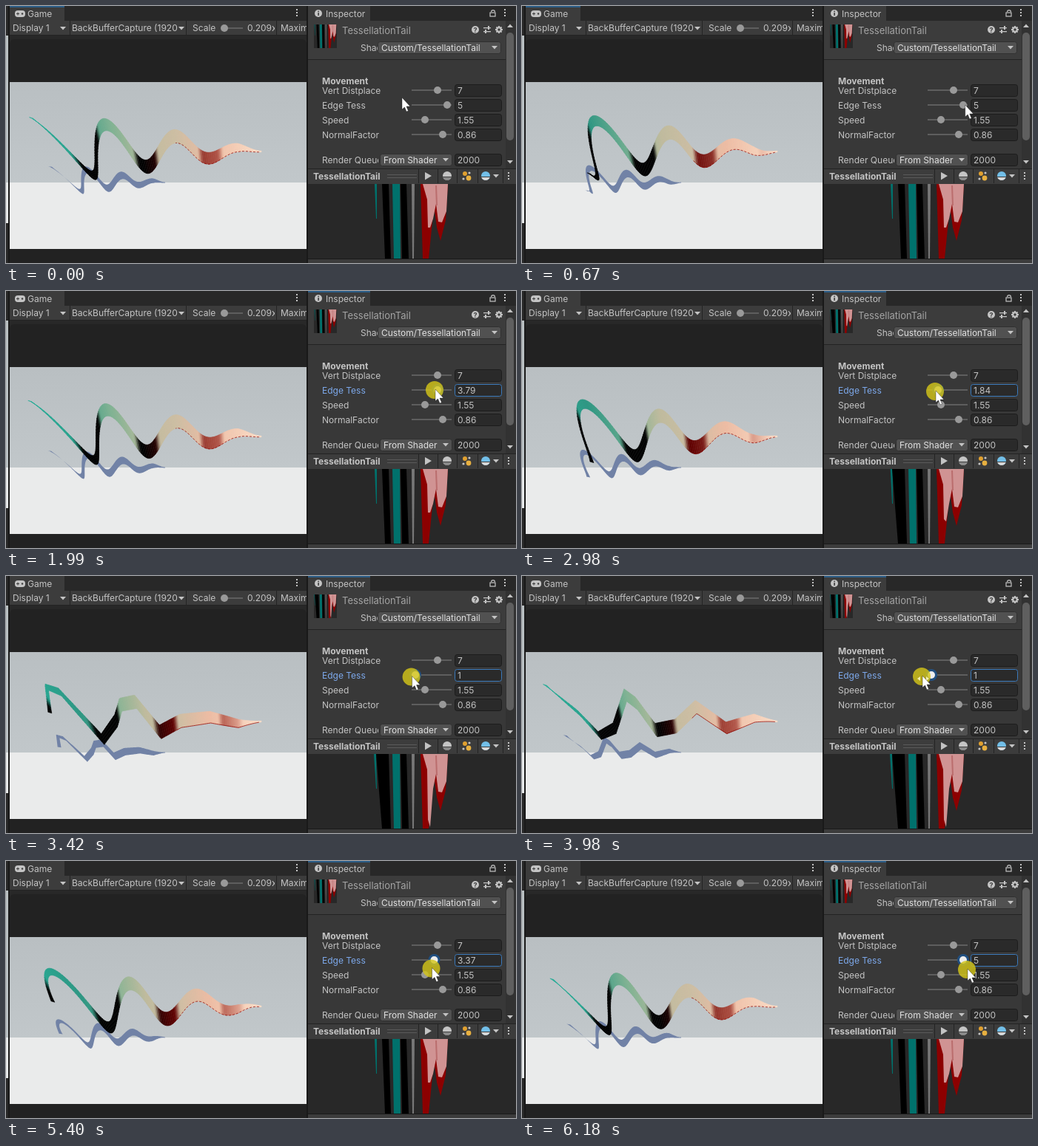
Write an HTML page with a canvas that moves like this. It is 689 px wide and 348 px high and loops after 6.3 s.

```html
<!DOCTYPE html>
<html>
<head>
<meta charset="utf-8">
<style>
html, body { margin: 0; width: 100%; height: 100%; overflow: hidden; background: #282828 }
canvas { display: block }
</style>
</head>
<body>
<canvas id="stage" width="689" height="348"></canvas>
<script>
const g = document.getElementById('stage').getContext('2d');
const LOOP = 6300, STEP = 110.4, FOCUS = 990, DRAG = 1400;
const TEXT = '#c4c4c4', PANE = '#383838', BAR = '#3c3c3c', EDGE = '#232323';

const clamp = (v, a = 0, b = 1) => Math.min(b, Math.max(a, v));
const mix = (a, b, k) => a + (b - a) * k;
const smooth = k => (k = clamp(k), k * k * (3 - 2 * k));

// Linear interpolation through rows of [key, value, value, ...].
function track(rows, key) {
  let i = 1;
  while (i < rows.length - 1 && rows[i][0] < key) i++;
  const a = rows[i - 1], b = rows[i], k = clamp((key - a[0]) / (b[0] - a[0]));
  return a.slice(1).map((v, j) => mix(v, b[j + 1], k));
}

// ---- drawing helpers
function rect(x, y, w, h, color) { g.fillStyle = color; g.fillRect(x, y, w, h); }
function round(x, y, w, h, color, border, r = 3) {
  g.beginPath(); g.roundRect(x + .5, y + .5, w - 1, h - 1, r);
  g.fillStyle = color; g.fill();
  g.strokeStyle = border; g.lineWidth = 1; g.stroke();
}
function dot(x, y, r, color) {
  g.beginPath(); g.arc(x, y, r, 0, 7); g.fillStyle = color; g.fill();
}
function poly(points, color) {
  g.beginPath();
  for (let i = 0; i < points.length; i += 2) g.lineTo(points[i], points[i + 1]);
  g.closePath(); g.fillStyle = color; g.fill();
}
function line(points, color, width = 1) {
  g.beginPath();
  for (let i = 0; i < points.length; i += 2) g.lineTo(points[i], points[i + 1]);
  g.strokeStyle = color; g.lineWidth = width; g.stroke();
}
function label(s, x, y, color = TEXT, size = 12, weight = 400) {
  g.font = `${weight} ${size}px Inter, Roboto, sans-serif`;
  g.fillStyle = color; g.fillText(s, x, y);
}
function clipped(x, y, w, h, paint) {
  g.save(); g.beginPath(); g.rect(x, y, w, h); g.clip(); paint(); g.restore();
}
const arrow = (x, y, s = 4, d = 1) => poly([x - s, y - 2 * d, x + s, y - 2 * d, x, y + 2.5 * d], TEXT);
const dots = (x, y) => [-4, 0, 4].forEach(d => rect(x - 1, y + d - 1, 2, 2, TEXT));

// ---- the waving tail: u runs from the head (0) to the tip (1)
const KNOTS = [0, .11, .245, .387, .49, .59, .66, .70, .8, .9, .94, 1];
const LIGHT = [[0, 252, 222, 200], [.25, 238, 188, 163], [.4, 206, 190, 163], [.55, 192, 187, 157],
  [.7, 125, 178, 146], [.85, 45, 150, 130], [1, 35, 172, 150]];
const DARK = [[0, 205, 110, 95], [.25, 165, 70, 58], [.42, 96, 0, 0], [.53, 25, 0, 0], [.58, 0, 0, 0], [1, 0, 0, 0]];

const phase = (u, t) => 2 * Math.PI * ((232 - 88 * t / 2027) - (345 - 282 * u)) / 88;
const thick = u => 1.5 + 17 * (4 * u * (1 - u)) ** .6 * clamp(u * 9);

function curve(u, t) {
  const lift = 44 * u * Math.cos(phase(u, t));
  return [345 - 282 * u - .75 * u ** 3 * lift, 197 - 7 * u - lift];
}
function tailPoint(u, t, coarse) {
  if (!coarse) return curve(u, t);
  return track(KNOTS.map(k => [k, ...curve(k, t)]), u);
}
function tailColor(u, t) {
  const k = clamp((u - .5) / .25), limit = -.55 + .6 * k;
  const lit = Math.cos(phase(u, t) + .52 * k);
  const shade = smooth((limit + .28 - lit) / .56) * smooth(u / .25);
  const a = track(LIGHT, u), b = track(DARK, u);
  return `rgb(${a.map((c, i) => Math.round(mix(c, b[i], shade)))})`;
}
function tail(t, coarse) {
  const N = 180, top = [], low = [], shadeTop = [], shadeLow = [];
  for (let i = 0; i <= N; i++) {
    const u = i / N, [x, y] = tailPoint(u, t, coarse), h = thick(u) / 2, s = 2.5 * u;
    top.push([x - s, y - h]);
    low.push([x + s, y + h]);
    const sx = 215 - (345 - x) * .5, sy = 239 - 2 * u + (y - 197) * .43;
    shadeTop.push([sx - s, sy - h * .55]);
    shadeLow.push([sx + s, sy + h * .55]);
  }
  poly([...shadeTop, ...shadeLow.reverse()].flat(), '#7182a6');
  for (let i = 0; i < N; i++) {
    const color = tailColor((i + .5) / N, t);
    const quad = [...top[i], ...top[i + 1], ...low[i + 1], ...low[i]];
    poly(quad, color);
    line([...quad, ...top[i]], color, .6);
  }
  g.setLineDash(coarse ? [] : [3, 2]);
  line(low.slice(2, N * .42).flat(), 'rgba(140,0,0,.75)', 1);
  g.setLineDash([]);
}

// ---- game view
function gameView(t, focused, coarse) {
  rect(0, 0, 407, 348, '#282828');
  rect(0, 40, 3, 199, '#b9c0c3');
  rect(0, 239, 3, 55, '#e6e8e9');
  rect(3, 0, 2, 348, '#191919');
  rect(5, 0, 74, 20, BAR);
  if (!focused) rect(5, 0, 74, 2, '#2c5d87');
  // gamepad
  g.beginPath(); g.roundRect(12, 6, 14, 9, 4); g.fillStyle = TEXT; g.fill();
  rect(14, 10, 4, 1, BAR); rect(15.5, 8.5, 1, 4, BAR); dot(22, 10.5, 1.2, BAR);
  label('Game', 29, 15);
  dots(393, 9);
  rect(5, 20, 402, 20, BAR);
  rect(5, 39, 402, 1, EDGE);
  label('Display 1', 9, 34); arrow(77, 30);
  label('BackBufferCapture (1920', 89, 34); arrow(237, 30);
  label('Scale', 252, 34);
  rect(291, 29, 29, 2, '#5e5e5e'); dot(295, 30, 5, '#999');
  clipped(320, 20, 43, 20, () => label('0.209x', 326, 34));
  clipped(366, 20, 40, 20, () => label('Maximize', 371, 34));
  [86, 243, 365].forEach(x => rect(x, 20, 1, 20, EDGE));
  rect(5, 40, 402, 308, '#282828');
  g.beginPath(); g.roundRect(5, 45, 401, 310, 6); g.fillStyle = '#222'; g.fill();

  const wall = g.createLinearGradient(0, 103, 0, 239);
  wall.addColorStop(0, '#b9bfc2'); wall.addColorStop(1, '#c1c7ca');
  rect(5, 103, 401, 136, wall);
  rect(5, 239, 401, 90, '#eaebeb');
  tail(t, coarse);
}

// ---- material preview; k is the share of coarse jaggedness
function strips(k) {
  const teal = '#00716c', red = '#8c0000', pink = '#d09393';
  poly([498 - k, 241, 501 - k, 241, 501, 288, 500, 288], teal);
  poly([508, 241, 517, 241, 520, 342, 512, 342], '#000');
  if (k) poly([500, 241, 512, 241, 513, 342, 508, 342], '#000');
  poly([522, 241, 532, 241, 533, 342, 524, 342], teal);
  poly([533, 241, 541, 241, 544, 342, 535, 342], '#000');
  poly([548, 241, 552, 241, 551, 342, 549, 342], '#777');
  poly([560, 241, 582, 241, 576, 292, 571, 342, 563, 342], red);
  poly([576, 241, 597, 241, 594, 290, 587, 318, 582, 300, 578, 270], red);
  poly([563, 241, 597, 241, 595, 278, 589, 293, 584, 292, 581, 268, 577, 288, 573, 300 + 40 * k, 570, 300 + 30 * k, 569, 262], pink);
  line([581, 243, 582, 270], '#ba6d6d', 2);
}

// ---- inspector
function slider(y, x, active) {
  rect(548, y - 1, 54, 2, '#5e5e5e');
  if (active) dot(x, y, 8, '#214f80');
  dot(x, y, 5, active ? '#eee' : '#999');
}
function field(y, s, active) {
  round(606, y - 8, 64, 17, '#2a2a2a', active ? '#3a79bb' : '#1c1c1c');
  label(s, 610, y + 5);
}
function dropdown(x, y, w, s) {
  round(x, y - 8, w, 17, '#515151', '#303030');
  label(s, x + 5, y + 5, '#e0e0e0');
  arrow(x + w - 9, y);
}
function inspector(t, focused, value, k) {
  rect(407, 0, 282, 348, PANE);
  rect(406, 0, 2, 348, '#191919');
  rect(408, 0, 281, 20, '#282828');
  rect(408, 0, 84, 20, BAR);
  if (focused) rect(408, 0, 84, 2, '#2c5d87');
  dot(422, 10, 5, TEXT); rect(421.3, 9, 1.6, 4, BAR); rect(421.3, 6.6, 1.6, 1.5, BAR);
  label('Inspector', 432, 15);
  g.strokeStyle = TEXT; g.lineWidth = 1.2;
  g.strokeRect(654, 9, 7, 5);
  g.beginPath(); g.arc(658, 8, 2.4, Math.PI, 0); g.stroke();
  dots(674, 9);

  rect(408, 20, 281, 53, BAR);
  rect(416, 25, 31, 32, '#282828');
  clipped(416, 25, 31, 32, () => {
    g.translate(416, 25); g.scale(.3, .32); g.translate(-496, -241); strips(k);
  });
  label('TessellationTail', 454, 38, '#a4a4a4', 13);
  dot(634, 32, 5, TEXT); label('?', 631.5, 35.5, BAR, 9, 700);
  [29, 34].forEach((y, i) => {
    rect(645, y, 10, 1.3, TEXT); rect(i ? 647 : 651, y - 2, 2, 5, TEXT);
  });
  for (let i = 0; i < 4; i++) {
    const a = i * Math.PI / 4, c = 5 * Math.cos(a), s = 5 * Math.sin(a);
    line([666 - c, 32 - s, 666 + c, 32 + s], TEXT, 2);
  }
  dot(666, 32, 3.8, TEXT); dot(666, 32, 1.7, BAR);
  label('Shader', 479, 61);
  dropdown(502, 56, 167, 'Custom/TessellationTail');
  rect(408, 72, 267, 1, EDGE);

  rect(675, 20, 14, 200, '#323232');
  arrow(681, 27, 4, -1); arrow(681, 211);
  g.beginPath(); g.roundRect(676, 36, 10, 146, 5); g.fillStyle = '#5f5f5f'; g.fill();

  label('Movement', 427, 106, TEXT, 12, 700);
  label('Vert Distplace', 427, 119);
  label('Edge Tess', 427, 139, focused ? '#7da9ec' : TEXT);
  label('Speed', 427, 159);
  label('NormalFactor', 427, 179);
  slider(114, 583); slider(134, 553 + (value - 1) * 10.75, focused);
  slider(154, 566); slider(174, 590);
  field(114, '7'); field(134, '', focused); field(154, '1.55'); field(174, '0.86');
  if (focused && t < DRAG) rect(608, 127, 10, 15, '#3d6ea8');
  label(String(+value.toFixed(2)), 610, 139);

  clipped(420, 198, 83, 22, () => label('Render Queue', 427, 213));
  dropdown(505, 208, 98, 'From Shader');
  field(208, '2000');
}
function preview(k) {
  rect(408, 220, 281, 21, BAR);
  rect(408, 220, 281, 1, EDGE);
  label('TessellationTail', 415, 235, TEXT, 12, 700);
  [228, 232].forEach(y => rect(515, y, 40, 1, '#5a5a5a'));
  [557, 583, 609, 637, 671].forEach(x => rect(x, 221, 1, 19, EDGE));
  poly([566, 225, 575, 230, 566, 235.5], TEXT);
  [[596, TEXT, '#8a8a8a'], [648, '#72bfe8', '#d8d8d8']].forEach(([x, upper, lower]) => {
    dot(x, 230, 6, upper);
    g.beginPath(); g.arc(x, 230, 6, .2, Math.PI - .2); g.fillStyle = lower; g.fill();
    rect(x - 6, 231, 12, 1, BAR);
  });
  dot(620, 227, 3, '#e0a030'); dot(625, 233, 3.4, '#e8b040'); dot(626, 226, 1.6, TEXT); dot(618, 234, 1.6, TEXT);
  arrow(662, 230); dots(679, 230);
  rect(408, 241, 281, 101, '#282828');
  clipped(408, 241, 281, 101, () => strips(k));
  rect(408, 342, 281, 1, '#191919');
  rect(408, 343, 281, 5, BAR);
}

// ---- pointer: [time, x, y]
const POINTER = [[0, 535, 125], [110, 540, 127], [650, 599, 135], [990, 592, 134], [1330, 592, 134],
  [1987, 580, 134], [2981, 559, 136], [3700, 542, 137], [3974, 541, 136], [4637, 541, 141],
  [4747, 551, 144], [6072, 600, 147], [6182, 602, 147]];

function pointer(x, y, pressed, sliding) {
  if (pressed) {
    g.globalAlpha = .82; dot(x - 1, y, 12, '#d3c418'); g.globalAlpha = 1;
  }
  if (sliding) {
    poly([x - 7, y + 3, x - 3, y, x - 3, y + 6], '#f4efb0');
    poly([x + 9, y + 3, x + 5, y, x + 5, y + 6], '#f4efb0');
  }
  const shape = [0, -1, 0, 15, 3.5, 12, 6, 18, 8.5, 17, 6, 11, 11, 11].map((v, i) => v + (i % 2 ? y : x));
  poly(shape, '#fff');
  line([...shape, x, y - 1], 'rgba(0,0,0,.6)', .6);
}

function draw(now) {
  const t = Math.floor((now % LOOP + 10) / STEP) * STEP;
  const [x, y] = track(POINTER, t);
  const focused = t >= FOCUS;
  const value = t < DRAG ? 5 : clamp(1 + (x - 550) / 10.75, 1, 5);
  const jagged = clamp((2.2 - value) / 1.2);
  gameView(t, focused, value === 1);
  inspector(t, focused, value, jagged);
  preview(jagged);
  pointer(x, y, focused, focused && x < 546);
}
const start = performance.now();
(function tick() {
  draw(performance.now() - start);
  requestAnimationFrame(tick);
})();
</script>
</body>
</html>
```
